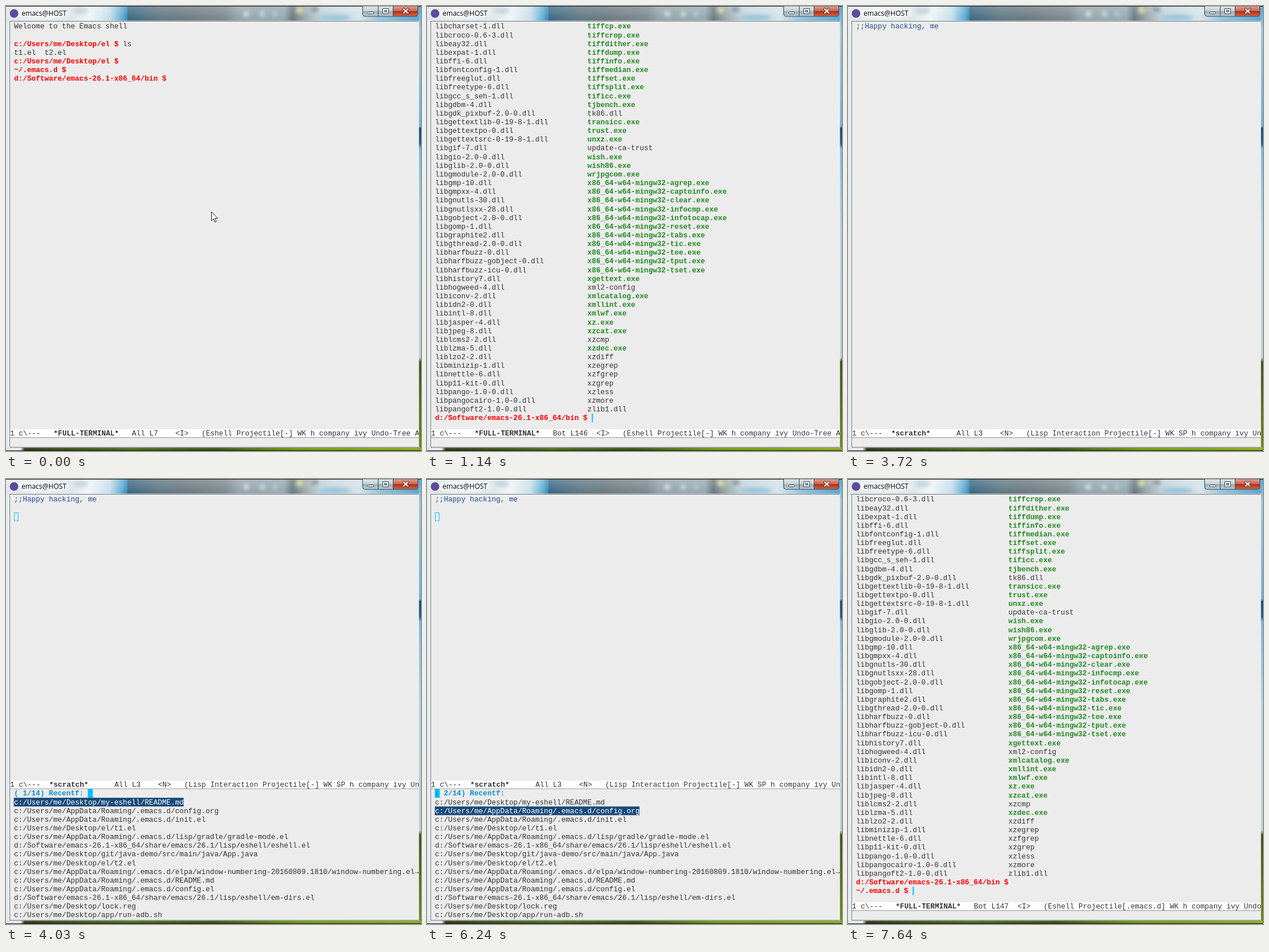
An HTML page for the animation above (8000 ms loop, 722 by 775 pixels).

```html
<!DOCTYPE html>
<html lang="en">
<head>
<meta charset="utf-8">
<title>Editor session</title>
<style>
html, body { margin: 0; width: 100%; height: 100%; overflow: hidden; }
#stage { position: relative; width: 722px; height: 775px; overflow: hidden; }
#stage > svg { position: absolute; left: 0; top: 0; }
#client { position: absolute; left: 7px; top: 27px; width: 711px; height: 741px; overflow: hidden; background: #ececec; }
/* 8 x 16 character cells, shown slightly reduced */
.cells { position: absolute; left: 7px; margin: 0; transform: scale(.947); transform-origin: 0 0;
  font: 13.3333px/16px "Liberation Mono", monospace; white-space: pre; color: #333; }
#buffer { top: .7px; }
#mini { top: 513px; left: 0; padding-left: 7.4px; width: 760px; height: 260px; background: #ececec; }
#bar { left: 0; width: 760px; height: 14px; padding-top: 1px; background: #fff; border-bottom: 1px solid #8c8c8c; }
.cursor { position: absolute; width: 8.45px; height: 15.84px; background: #00bfff; box-sizing: border-box; }
.cursor.beam { width: 2.1px; }
.cursor.hollow { background: none; border: 1.06px solid #00bfff; }
.line { position: relative; top: 1px; }
.prompt { color: #f00; font-weight: bold; }
.exe { color: #228b22; font-weight: bold; }
.comment { color: #1f4f8b; }
.ask { color: #0a8fd0; font-weight: bold; }
.pick { padding-top: 1px; background: #174a7a; color: #fff; }
.h1 { color: #00568f; font-weight: bold; }
.h2 { color: #0a86c8; font-weight: bold; }
.h3 { color: #b02020; font-weight: bold; }
</style>
</head>
<body>
<div id="stage">
  <svg width="722" height="775" viewBox="0 0 722 775">
    <defs>
      <linearGradient id="sky">
        <stop offset="0" stop-color="#dfe6e8"/><stop offset=".16" stop-color="#dce6ea"/>
        <stop offset=".2" stop-color="#f0f5f7"/><stop offset=".25" stop-color="#c5dde9"/>
        <stop offset=".28" stop-color="#5aaad3"/><stop offset=".292" stop-color="#2f88b5"/>
        <stop offset=".294" stop-color="#346480"/><stop offset=".37" stop-color="#5d747f"/>
        <stop offset=".43" stop-color="#66757c"/><stop offset=".53" stop-color="#77868c"/>
        <stop offset=".56" stop-color="#8fa1a8"/><stop offset=".67" stop-color="#93a6ae"/>
        <stop offset=".69" stop-color="#64747a"/><stop offset=".72" stop-color="#98a6a8"/>
        <stop offset=".76" stop-color="#c0d2da"/><stop offset=".85" stop-color="#d4e2e9"/>
        <stop offset=".9" stop-color="#8dc3de"/><stop offset="1" stop-color="#4ba2d2"/>
      </linearGradient>
      <linearGradient id="edge" x2="0" y2="1">
        <stop offset="0" stop-color="#4fa8d8"/><stop offset=".05" stop-color="#9cc6da"/>
        <stop offset=".27" stop-color="#6cb2d8"/><stop offset=".275" stop-color="#0e4a7a"/>
        <stop offset=".31" stop-color="#1a5c94"/><stop offset=".32" stop-color="#7ab8dc"/>
        <stop offset=".5" stop-color="#a9d0e4"/><stop offset=".79" stop-color="#b8cfc8"/>
        <stop offset=".8" stop-color="#3c4f12"/><stop offset="1" stop-color="#6b8a12"/>
      </linearGradient>
      <linearGradient id="grass">
        <stop offset=".035" stop-color="#dfe5e6"/><stop offset=".045" stop-color="#2c3a18"/>
        <stop offset=".3" stop-color="#4a6a14"/><stop offset=".5" stop-color="#38500f"/>
        <stop offset=".7" stop-color="#6d9410"/><stop offset="1" stop-color="#86a818"/>
      </linearGradient>
      <linearGradient id="shine" x2="0" y2="1">
        <stop offset="0" stop-color="#fff" stop-opacity=".25"/><stop offset="1" stop-color="#fff" stop-opacity="0"/>
      </linearGradient>
      <linearGradient id="grey" x2="0" y2="1">
        <stop offset="0" stop-color="#e2eaee"/><stop offset=".48" stop-color="#c3d0d7"/>
        <stop offset=".5" stop-color="#9aabb5"/><stop offset="1" stop-color="#bccbd3"/>
      </linearGradient>
      <linearGradient id="red" x2="0" y2="1">
        <stop offset="0" stop-color="#e2a394"/><stop offset=".48" stop-color="#cc6450"/>
        <stop offset=".5" stop-color="#b02a16"/><stop offset="1" stop-color="#cf6a4c"/>
      </linearGradient>
      <filter id="soft" x="-1" y="-1" width="3" height="3"><feGaussianBlur stdDeviation="3"/></filter>
    </defs>
    <rect width="722" height="775" fill="#e6eced"/>
    <rect width="722" height="27" fill="url(#sky)"/>
    <g filter="url(#soft)">
      <ellipse cx="62" cy="13" rx="48" ry="9" fill="#fff" opacity=".75"/>
      <ellipse cx="130" cy="8" rx="14" ry="6" fill="#9fb9c6" opacity=".6"/>
      <circle cx="418" cy="14" r="5" fill="#d4dcdf"/>
      <circle cx="446" cy="14" r="5" fill="#c5d0d4"/>
      <circle cx="468" cy="14" r="4" fill="#b9c6cb"/>
      <circle cx="511" cy="7" r="6" fill="#d3d394"/>
      <ellipse cx="537" cy="6" rx="7" ry="3" fill="#5c6a6c"/>
      <ellipse cx="572" cy="20" rx="28" ry="5" fill="#8fc0d8"/>
    </g>
    <rect width="722" height="27" fill="url(#shine)"/>
    <rect x="718" width="4" height="775" fill="url(#edge)"/>
    <rect y="769" width="722" height="6" fill="url(#grass)"/>
    <rect x="5.5" y="25.5" width="713" height="744" fill="none" stroke="#fff" opacity=".5"/>
    <rect x="6.5" y="26.5" width="711" height="742" fill="none" stroke="#6d7678"/>
    <path d="M0 .5H722M0 774.5H722" stroke="#1c2224"/>
    <circle cx="14" cy="13" r="7.5" fill="#5f4a9b"/>
    <text x="27" y="17" font-family="'Open Sans', sans-serif" font-size="12" fill="#000">emacs@HOST</text>
    <g stroke="#39464d">
      <path d="M620.5 0V14q0 4 4 4H673.5V0z" fill="url(#grey)"/>
      <path d="M673.5 0V18H712q4.5 0 4.5-4V0z" fill="url(#red)"/>
      <path d="M647.5 0V18"/>
      <rect x="629.5" y="10.5" width="10" height="3" rx="1" fill="#fff"/>
      <path d="M655.5 4.5h10v9h-10zM658.5 7.5v3h4v-3z" fill="#fff" fill-rule="evenodd"/>
    </g>
    <g fill="none" stroke-linecap="square">
      <path d="M692 5.5l7 6.5m0-6.5l-7 6.5" stroke="#5b2a24" stroke-width="4"/>
      <path d="M692 5.5l7 6.5m0-6.5l-7 6.5" stroke="#fff" stroke-width="2.2"/>
    </g>
  </svg>
  <div id="client">
    <pre id="buffer" class="cells"></pre>
    <pre id="bar" class="cells"></pre>
    <pre id="mini" class="cells"></pre>
  </div>
  <svg id="pointer" width="722" height="775">
    <path d="M357.5 358.5v15.5l3.6-3.4 2.5 5.9 2.3-1-2.5-5.7h4.9z" fill="#fff" stroke="#222"/>
  </svg>
</div>
<script>
const DURATION = 8000;
const byId = id => document.getElementById(id);
const words = text => text.trim().split(/\s+/);
const span = (type, text) => `<span class="${type}">${text}</span>`;
const prompt = dir => span('prompt', dir + ' $ ');

const HOME = 'c:/Users/me/';
const DESKTOP = HOME + 'Desktop/';
const CONFIG = HOME + 'AppData/Roaming/.emacs.d/';
const EMACS = 'd:/Software/emacs-26.1-x86_64/';
const BIN = EMACS + 'bin';

const libraries = words(`charset-1 croco-0.6-3 eay32 expat-1 ffi-6 fontconfig-1 freeglut freetype-6
  gcc_s_seh-1 gdbm-4 gdk_pixbuf-2.0-0 gettextlib-0-19-8-1 gettextpo-0 gettextsrc-0-19-8-1 gif-7
  gio-2.0-0 glib-2.0-0 gmodule-2.0-0 gmp-10 gmpxx-4 gnutls-30 gnutlsxx-28 gobject-2.0-0 gomp-1
  graphite2 gthread-2.0-0 harfbuzz-0 harfbuzz-gobject-0 harfbuzz-icu-0 history7 hogweed-4 iconv-2
  idn2-0 intl-8 jasper-4 jpeg-8 lcms2-2 lzma-5 lzo2-2 minizip-1 nettle-6 p11-kit-0 pango-1.0-0
  pangocairo-1.0-0 pangoft2-1.0-0`).map(name => `lib${name}.dll`);

const mingw = words('agrep captoinfo clear infocmp infotocap reset tabs tic toe tput tset')
  .map(name => `x86_64-w64-mingw32-${name}.exe`);
const programs = [
  ...words(`tiffcp.exe tiffcrop.exe tiffdither.exe tiffdump.exe tiffinfo.exe tiffmedian.exe
    tiffset.exe tiffsplit.exe tificc.exe tjbench.exe tk86.dll transicc.exe trust.exe unxz.exe
    update-ca-trust wish.exe wish86.exe wrjpgcom.exe`),
  ...mingw,
  ...words(`xgettext.exe xml2-config xmlcatalog.exe xmllint.exe xmlwf.exe xz.exe xzcat.exe xzcmp
    xzdec.exe xzdiff xzegrep xzfgrep xzgrep xzless xzmore zlib1.dll`)
];
const listing = libraries.map((lib, i) => {
  const name = programs[i];
  return lib.padEnd(35) + (name.endsWith('.exe') ? span('exe', name) : name);
});

const recentFiles = [
  DESKTOP + 'my-eshell/README.md', CONFIG + 'config.org', CONFIG + 'init.el', DESKTOP + 'el/t1.el',
  CONFIG + 'lisp/gradle/gradle-mode.el', EMACS + 'share/emacs/26.1/lisp/eshell/eshell.el',
  DESKTOP + 'git/java-demo/src/main/java/App.java', DESKTOP + 'el/t2.el',
  CONFIG + 'elpa/window-numbering-20160809.1810/window-numbering.el<b>→</b>',
  CONFIG + 'README.md', CONFIG + 'config.el', EMACS + 'share/emacs/26.1/lisp/eshell/em-dirs.el',
  DESKTOP + 'lock.reg', DESKTOP + 'app/run-adb.sh'
];

const modeLine = (flags, name, position, state, modes) =>
  `1 ${flags}<b>${name}</b>${position}&lt;${state}>${modes} company ivy Undo-Tree ARev`;
const shellBar = (position, project) =>
  modeLine('c\\---   ', '*FULL-TERMINAL*', '   ' + position.padEnd(10), 'I', `   (Eshell Projectile[${project}] WK h`);

// Each scene: buffer lines, mode line, cursor [column, row, style], optional minibuffer lines.
const shell = typed => ({
  lines: ['Welcome to the Emacs shell', '', prompt(DESKTOP + 'el') + 'ls', 't1.el  t2.el',
    prompt(DESKTOP + 'el'), prompt('~/.emacs.d'), prompt(BIN) + typed],
  bar: shellBar('All L7', '-'),
  cursor: [36 + typed.length, 6, 'beam']
});
const listed = {
  lines: [...listing, prompt(BIN)],
  bar: shellBar('Bot L146', '-'),
  cursor: [36, 45, 'beam']
};
const changedDir = {
  lines: [...listing.slice(1), prompt(BIN), prompt('~/.emacs.d')],
  bar: shellBar('Bot L147', '.emacs.d'),
  cursor: [13, 45, 'beam']
};
const scratch = {
  lines: [span('comment', ';;Happy hacking, me')],
  bar: modeLine('c\\---  ', '*scratch*', '      All L3    ', 'N', '   (Lisp Interaction Projectile[-] WK SP h'),
  cursor: [0, 2, '']
};
const recent = (choice, column) => ({
  ...scratch,
  cursor: [column, 0, ''],
  mini: [span('ask', `( ${choice}/14) Recentf: `),
    ...recentFiles.map((file, i) => i + 1 === choice ? span('pick', file) : file)]
});
const outline = {
  lines: [span('h1', '* Emacs Configurations'), span('h2', '** Base screen...'),
    span('h2', '** Packages and elpa configurations...'), span('h2', '** Custom Functions'),
    span('h3', '*** cover with better keybindings...'), span('h3', '*** my functions...')],
  bar: modeLine('-(Unix)---  ', 'config.org', '     All L437  ', 'N', '  Git-win  (Org ARev Projectile[.emacs.d] WK SP h'),
  cursor: [0, 6, '']
};

const timeline = [
  [0, shell('')], [330, shell('l')], [420, shell('ls')], [1140, listed], [2250, scratch],
  [4030, recent(1, 17)], [6000, recent(2, 17)], [6240, recent(2, 0)], [6270, scratch],
  [6300, outline], [7640, changedDir]
];
const cursorHidden = [[0, 330], [1640, 2130], [2750, 3230], [3720, 4030], [4520, 5010], [5500, 6000], [6750, 7240]];

const cursorBox = (column, row, style, inset = 0) =>
  `<i class="cursor ${style}" style="left:${column * 8 + inset}px;top:${row * 16}px"></i>`;
const block = (lines, cursor) => cursor + `<span class="line">${lines.join('\n')}</span>`;

let shown = '';
function draw(time) {
  const index = timeline.findLastIndex(([start]) => start <= time);
  const hidden = cursorHidden.some(([from, to]) => time >= from && time < to);
  const key = index + '/' + hidden;
  if (key === shown) return;
  shown = key;
  const { lines, bar, cursor, mini } = timeline[index][1];
  const caret = hidden ? '' : cursorBox(...cursor, mini ? 7.4 : 0);
  byId('buffer').innerHTML = block(lines, mini ? cursorBox(0, 2, 'hollow') : caret);
  byId('bar').innerHTML = bar;
  byId('bar').style.top = mini ? '497.6px' : '710.4px';
  byId('mini').style.display = mini ? '' : 'none';
  byId('mini').innerHTML = mini ? block(mini, caret) : '';
  byId('pointer').style.display = index === 0 ? '' : 'none';
}

const began = performance.now();
function tick() {
  draw((performance.now() - began) % DURATION);
  requestAnimationFrame(tick);
}
tick();
</script>
</body>
</html>
```
